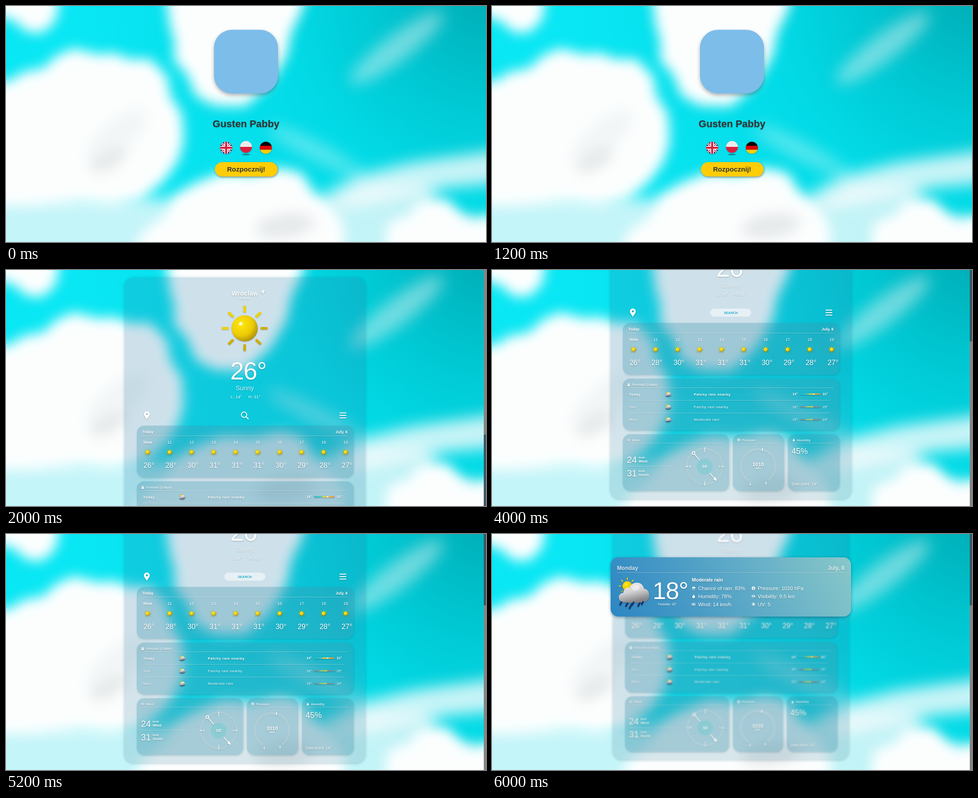
An HTML page for the animation above (8000 ms loop, 1064 px wide and 526 px high).

```html
<!DOCTYPE html>
<html lang="en">
<head>
<meta charset="utf-8">
<title>Weather</title>
<style>
html, body { margin: 0; width: 100%; height: 100%; overflow: hidden; background: #04dfec; }
#stage { position: absolute; left: 0; top: 0; width: 1064px; height: 526px; overflow: hidden; }
#stage div, svg { position: absolute; box-sizing: border-box; }
svg { left: 0; top: 0; overflow: visible; }
text { font-family: "Liberation Sans", Arial, sans-serif; white-space: pre; }
.layer { left: 0; top: 0; width: 1064px; height: 526px; }
.lit { filter: drop-shadow(.6px 1px 1px rgba(0,0,0,.28)); }
#app { height: 760px; transform-origin: 529.5px 377.5px; }
.panel { border-radius: 20px; background: linear-gradient(rgba(42,122,166,.22) 60%, rgba(90,150,170,.22)); box-shadow: 0 1px 7px rgba(20,80,100,.3); }
.card { border-radius: 16px; background: rgba(64,149,172,.33); box-shadow: 1px 2px 4px rgba(30,90,110,.25); }
.logo { left: 461px; top: 53px; width: 142px; height: 142px; border-radius: 40px; background: #7dbdea; box-shadow: 0 4px 8px rgba(0,0,0,.3); }
.start { left: 462.5px; top: 348px; width: 139px; height: 32px; border-radius: 16px; background: #ffcd05; box-shadow: 1px 2px 4px rgba(0,0,0,.4); }
.modal { left: 263px; top: 52px; width: 532.5px; height: 132px; border-radius: 17px; background: linear-gradient(62deg, #2b86c3 0%, #5ba8c7 52%, #89c8c9 100%); box-shadow: 0 2px 6px rgba(0,50,80,.4); }
#bar { right: 0; top: 0; width: 5.5px; height: 526px; background: #3d5663; }
#thumb { left: 0; width: 100%; height: 367px; background: #858585; }
</style>
</head>
<body>
<div id="stage">
  <svg id="sky" width="1064" height="526"></svg>
  <div id="intro" class="layer">
    <div class="logo"></div>
    <div class="start"></div>
    <svg id="introArt" width="1064" height="526"></svg>
  </div>
  <div id="app" class="layer"><svg id="appArt" width="1064" height="760"></svg></div>
  <div id="modal" class="layer">
    <div class="modal"></div>
    <svg id="modalArt" class="lit" width="1064" height="526"></svg>
  </div>
  <div id="bar"><div id="thumb"></div></div>
</div>
<script>
const $ = id => document.getElementById(id);
const SCROLL = 229;

// ---- drawing helpers ----
const text = (x, y, size, str, o = {}) =>
  `<text x="${x}" y="${y}" font-size="${size}" fill="${o.fill || '#fff'}" font-weight="${o.b ? 700 : 400}"` +
  ` text-anchor="${o.at || 'start'}" letter-spacing="${o.ls || 0}" opacity="${o.op || 1}">${str}</text>`;
const rule = (x1, x2, y) => `<path d="M${x1} ${y}H${x2}" stroke="#fff" stroke-opacity=".42" stroke-width=".8"/>`;
const stroke = (d, w = 1, color = '#fff') =>
  `<path d="${d}" fill="none" stroke="${color}" stroke-width="${w}" stroke-linecap="round" stroke-linejoin="round"/>`;
const fill = (d, color = '#fff') => `<path d="${d}" fill="${color}" fill-rule="evenodd"/>`;
const disc = (x, y, r, color = '#fff') => `<circle cx="${x}" cy="${y}" r="${r}" fill="${color}"/>`;
const put = (x, y, s, art) => `<g transform="translate(${x} ${y}) scale(${s})">${art}</g>`;
const blob = (pts, color = '#fcfefe', op = 1) => `<polygon points="${pts}" fill="${color}" opacity="${op}"/>`;
const oval = (x, y, rx, ry, turn, color, op) =>
  `<ellipse rx="${rx}" ry="${ry}" transform="translate(${x} ${y}) rotate(${turn})" fill="${color}" opacity="${op}"/>`;

// ---- sky ----
const soft = (id, d) =>
  `<filter id="${id}" filterUnits="userSpaceOnUse" x="-100" y="-100" width="1264" height="726" color-interpolation-filters="sRGB"><feGaussianBlur stdDeviation="${d}"/></filter>`;
$('sky').innerHTML = `<defs>${soft('soft', 14)}${soft('softer', 17)}
  <radialGradient id="air" gradientUnits="userSpaceOnUse" cx="1064" cy="-20" r="900">
    <stop offset="0" stop-color="#00aeb7"/><stop offset=".25" stop-color="#00c7d2"/>
    <stop offset=".5" stop-color="#02dbe7"/><stop offset="1" stop-color="#0ae7f4"/>
  </radialGradient>
  <radialGradient id="ball" cx=".36" cy=".32" r=".75">
    <stop offset="0" stop-color="#fff9b0"/><stop offset=".13" stop-color="#fae20c"/>
    <stop offset=".6" stop-color="#edcb05"/><stop offset="1" stop-color="#a88a0a"/>
  </radialGradient>
  <linearGradient id="puff" x1="0" y1="0" x2=".35" y2="1">
    <stop offset="0" stop-color="#f6f6f6"/><stop offset=".55" stop-color="#cfcfd1"/><stop offset="1" stop-color="#858589"/>
  </linearGradient>
  <linearGradient id="heat">
    <stop offset="0" stop-color="#16c3dd"/><stop offset=".3" stop-color="#3cc7c4"/>
    <stop offset=".5" stop-color="#e6dc3c"/><stop offset="1" stop-color="#f58b3c"/>
  </linearGradient>
  <linearGradient id="mild">
    <stop offset="0" stop-color="#6fcf9a"/><stop offset="1" stop-color="#dfd83e"/>
  </linearGradient></defs>
  <rect width="1064" height="526" fill="url(#air)"/>
  <g filter="url(#softer)">
    ${blob('-60,400 260,424 350,428 430,470 650,450 740,430 800,400 900,398 965,420 930,458 1120,480 1120,590 -60,590', '#f3f9fb', .8)}
    ${blob('690,428 780,378 900,348 1120,318 1120,392 950,408 850,430 750,450', '#fbfcfd', .8)}
    ${oval(866, 94, 128, 29, -37, '#e2f2f2', .5)}
    ${oval(685, 322, 118, 20, 27, '#d0f6f8', .42)}
  </g>
  <g filter="url(#soft)">
    ${blob('-60,-60 122,-60 112,30 82,60 46,58 20,34 -60,8')}
    ${blob('-60,176 16,164 34,148 84,138 110,112 150,94 206,108 240,104 272,118 320,118 358,158 364,200 390,240 394,300 382,344 352,388 300,432 236,446 170,438 60,446 -60,446')}
    ${blob('350,-60 362,40 374,82 372,120 402,154 420,200 462,222 530,224 586,174 622,112 632,60 656,10 674,-60')}
    ${blob('268,570 306,500 350,470 368,424 416,396 480,370 550,374 606,360 656,372 682,414 722,446 750,492 746,570')}
    ${blob('836,570 846,484 896,464 920,430 982,432 1006,464 1034,484 1064,472 1120,474 1120,570')}
    ${oval(245, 292, 85, 34, -42, '#f1f4f4', .8)}
    ${oval(228, 344, 46, 20, -30, '#e2e4e4', .75)}
    ${oval(618, 490, 66, 28, -8, '#e4e7e8', .85)}
  </g>`;

// ---- weather icons ----
const rays = (r1, r2, w) => Array.from({ length: 8 }, (_, i) =>
  `<path d="M0 ${-r1}V${-r2}" transform="rotate(${i * 45})" stroke="${i > 1 && i < 6 ? '#cfae08' : '#efd30a'}" stroke-width="${w}" stroke-linecap="round"/>`).join('');
const sun = rays(38, 48, 6) + disc(0, 0, 29, 'url(#ball)') +
  oval(-9, -10, 4, 3, -40, '#fff', .75);
const rainLines = [[-25, 18], [-12, 21], [2, 18], [15, 21], [-4, 26], [23, 17]]
  .map(([x, y]) => stroke(`M${x} ${y}l-5 9`, 3.2, '#1c2c66')).join('');
const rainy = put(-14, -14, .37, rays(39, 50, 6) + disc(0, 0, 29, 'url(#ball)')) + rainLines +
  fill('M-22 22C-36 21-37 3-23 1C-22-8-15-12-9-10C-5-25 20-26 23-8C37-8 39 18 25 21Q2 25-22 22Z', 'url(#puff)') +
  oval(5, -10, 9, 6, -20, '#fff', .45) + rainLines.replace(/l-5 9/g, 'm-2 4l-3 6');

// ---- small glyphs, each about 8 units wide around 0,0 ----
const glyph = {
  calendar: fill('M-3.5-3H-2.5V-4H-1.3V-3H1.3V-4H2.5V-3H3.5V4H-3.5ZM-3.5-1.2H3.5V-.7H-3.5Z'),
  wind: stroke('M-4-1.5H1.5C3.5-1.5 3-4 1.2-3.5M-4 0H3C5 0 4.5 3 2.5 2.3M-4 1.6H0C2 1.6 1.5 4.3-.3 3.5', 1),
  gauge: fill('M0-4A4 4 0 1 0 0 4A4 4 0 1 0 0-4ZM-.5-2.5H.5V.6A1.2 1.2 0 1 1-.5.6ZM-2.8-1H-1.8V0H-2.8ZM1.8-1H2.8V0H1.8Z'),
  drop: fill('M0-4C1-1.8 3-.5 3 1.4A3 2.8 0 0 1-3 1.4C-3-.5-1-1.8 0-4Z'),
  rain: fill('M-3 .5A2 2 0 0 1-3-2A3 2.8 0 0 1 2.2-2.7A1.8 1.8 0 0 1 3.2 .5Z') +
    stroke('M-2.5 2l-.6 1.8M-.2 2l-.6 1.8M2.1 2l-.6 1.8', .9),
  eye: fill('M-4.5 0Q0-6 4.5 0Q0 6-4.5 0ZM0-2A2 2 0 1 0 0 2A2 2 0 1 0 0-2Z') + disc(.2, 0, 1),
  uv: disc(0, 0, 2) + `<circle r="3.3" fill="none" stroke="#fff" stroke-width="1.8" pathLength="16" stroke-dasharray="1 1"/>`
};

// ---- welcome screen ----
const round = (id, x, y, r, art) => `<clipPath id="${id}"><circle r="${r}"/></clipPath>` +
  `<g transform="translate(${x} ${y})"><g clip-path="url(#${id})">${art}</g></g>`;
const band = (y, h, color) => `<rect x="-15" y="${y}" width="30" height="${h}" fill="${color}"/>`;
const cross = 'M-15 0H15M0-15V15', saltire = 'M-14-14L14 14M-14 14L14-14';
const line = (d, w, color) => `<path d="${d}" stroke="${color}" stroke-width="${w}"/>`;
$('introArt').innerHTML =
  `<g class="lit">${text(532, 270, 22, 'Gusten Pabby', { b: 1, at: 'middle', fill: '#333' })}</g>` +
  oval(532, 331, 9, 1.7, 0, '#155f70', .65) +
  `<g class="lit">` +
  round('uk', 488, 316, 13.4, band(-15, 30, '#16226b') + line(saltire, 5, '#fff') + line(saltire, 1.6, '#d81e3a') +
    line(cross, 8, '#fff') + line(cross, 4.4, '#d81e3a')) +
  round('pl', 532, 314, 13.2, band(-15, 15, '#ebebeb') + band(0, 15, '#dc1f3f')) +
  round('de', 576, 316, 13.4, band(-15, 11, '#050505') + band(-4.5, 9, '#dd0505') + band(4.5, 11, '#ffce00')) +
  `</g>` + text(532.3, 369, 15.1, 'Rozpocznij!', { b: 1, at: 'middle', fill: '#333' });

// ---- dashboard ----
const box = (cls, x, y, w, h) =>
  `<div class="${cls}" style="left:${x}px;top:${y}px;width:${w}px;height:${h}px"></div>`;
$('app').insertAdjacentHTML('afterbegin',
  box('panel', 263, 17, 532.5, 721.5) + box('card', 290, 347, 479.5, 115) + box('card', 290, 471, 479.5, 115) +
  box('card', 290, 595, 235, 125.5) + box('card', 534, 595, 113, 125.5) + box('card', 656, 595, 113.5, 125.5));

const mid = { at: 'middle' }, bold = { b: 1 }, boldMid = { b: 1, at: 'middle' };
const head = (icon, x, y, str, x2) =>
  `<g opacity=".8">${put(x + 3.5, y - 2.5, .85, glyph[icon])}${text(x + 10.5, y, 7, str, bold)}</g>` + rule(x, x2, y + 4.5);

const now = text(529.5, 57, 14.4, 'Wroclaw', boldMid) + text(529.5, 65, 5.8, '10:58:32', boldMid) +
  fill('M574 44L563.5 48.6L568.4 49.7L569.5 54.5Z') + put(529, 130, 1, sun) +
  text(497, 244, 55, '26°', { ls: -1 }) + text(529.3, 268, 14.4, 'Sunny', { at: 'middle', op: .8 }) +
  text(498, 285.7, 9.6, 'L: 14°') + text(537, 285.7, 9.6, 'H: 31°') +
  fill('M312.2 333.5C310.5 329.5 305.7 326 305.7 321.3A6.5 6.5 0 0 1 318.7 321.3C318.7 326 313.9 329.5 312.2 333.5ZM312.2 319A2.3 2.3 0 1 0 312.2 323.6A2.3 2.3 0 1 0 312.2 319Z') +
  stroke('M740 318.5H753.5M740 324H753.5M740 329.5H753.5', 2);

const temps = [26, 28, 30, 31, 31, 31, 30, 29, 28, 27];
const hours = text(302, 364, 8.7, 'Today', bold) + text(757, 364, 8.7, 'July, 6', { b: 1, at: 'end' }) + rule(302, 757, 369.5) +
  temps.map((t, i) => {
    const x = 314 + i * 48.78;
    return text(x, 386.7, 9, i ? 10 + i : 'Now', i ? mid : boldMid) +
      put(x, 406.3, .165, sun) + text(x - 9.3, 440.7, 16, t + '°');
  }).join('');

const days = [['Today', 'Patchy rain nearby', 14, 31], ['Sun.', 'Patchy rain nearby', 16, 25], ['Mon.', 'Moderate rain', 15, 24]];
const forecast = head('calendar', 299.5, 487, 'Forecast (3 days)', 757) + days.map(([day, sky, lo, hi], i) => {
  const y = 508.5 + i * 28.3, first = i === 0, o = { b: first, ls: .55 };
  const track = (x, w, c) => `<rect x="${x}" y="${y - 4.2}" width="${w}" height="2.6" rx="1.3" fill="${c}"/>`;
  return text(304, y, 8, day, o) + put(391, y - 3, .19, rainy) + text(447.5, y, 8, sky, o) +
    text(666, y - .3, 7.7, lo + '°', { b: first }) + text(733, y - .3, 7.7, hi + '°', { b: first }) +
    (first ? track(683, 45, 'url(#heat)') + disc(713, y - 2.9, 1.5)
           : track(683, 45, '#7894a0') + track(694, 19 - i, 'url(#mild)')) +
    (i < 2 ? rule(304, 750, y + 11) : '');
}).join('');

const speed = (y, n, name) => text(299, y, 20, n) + text(325, y - 10, 6, 'km/h', bold) + text(325, y - 1, 8, name, bold);
const compass = put(471.5, 667, 1,
  `<circle r="39.7" fill="none" stroke="#fff" stroke-opacity=".6" stroke-width="4.6" pathLength="90" stroke-dasharray=".28 .72"/>` +
  text(0, 3.3, 9.4, 'SE', boldMid) +
  stroke('M0-42V-37M0 42V37M-42 0H-37M42 0H37', 1.4) +
  text(0, -32.5, 4.5, 'N', boldMid) + text(0, 36, 4.5, 'S', boldMid) +
  text(-33, 1.6, 4.5, 'W', boldMid) + text(33, 1.6, 4.5, 'E', boldMid) +
  `<circle cx="-25" cy="-30" r="3.2" fill="none" stroke="#fff" stroke-width="1.6"/>` +
  stroke('M-22.5-27L-11.5-14.5M12 15.5L23 28', 1.8) + fill('M27 32L18 28L21.7 26.4L23.5 22.6Z'));
const wind = head('wind', 299.5, 610.5, 'Wind', 514) + speed(659, 24, 'Wind') + rule(300, 403, 666.5) + speed(689, 31, 'Gusts') + compass;

const polar = (r, deg) => [r * Math.cos(deg * Math.PI / 180), r * Math.sin(deg * Math.PI / 180)].map(v => v.toFixed(2)).join(' ');
const pressure = head('gauge', 543.5, 610.5, 'Pressure', 637) + put(590, 667, 1,
  `<path d="M${polar(38.3, 124)}A38.3 38.3 0 1 1 ${polar(38.3, 56)}" fill="none" stroke="#fff" stroke-opacity=".62" stroke-width="5" pathLength="70" stroke-dasharray=".32 .68"/>` +
  stroke('M8.6-35L9.8-40', 2) + text(0, -.7, 11.5, '1010', boldMid) + text(0, 6.3, 6, 'hPa', boldMid) +
  stroke('M-17.5 35V42M-20.5 39L-17.5 42L-14.5 39M17.5 42V35M14.5 38L17.5 35L20.5 38', 1));
const humidity = head('drop', 665.5, 610.5, 'Humidity', 759) + text(664, 639, 18, '45%') + text(664.3, 709, 8.8, 'Dew point: 14°');

$('appArt').innerHTML = `${disc(471.5, 667, 17.5, 'rgba(110,205,208,.45)')}
  <g class="lit">${now}
  <g id="lens">${stroke('M532.5 327.5L537 332', 2.4)}<circle cx="527.7" cy="322.6" r="6" fill="none" stroke="#fff" stroke-width="2"/></g>
  ${hours}${forecast}${wind}${pressure}${humidity}</g>
  <g id="search"><rect x="484" y="315" width="90.5" height="18" rx="9" fill="#fff" opacity=".5"/>
  ${text(529.3, 326.7, 7.3, 'SEARCH', { b: 1, at: 'middle', fill: '#23b2ca' })}</g>`;

// ---- day details ----
const facts = [
  ['rain', 'Chance of rain: 83%', 'gauge', 'Pressure: 1020 hPa'],
  ['drop', 'Humidity: 78%', 'eye', 'Visibility: 9.5 km'],
  ['wind', 'Wind: 14 km/h', 'uv', 'UV: 5']
];
$('modalArt').innerHTML = text(277, 80, 12.4, 'Monday', { b: 1, op: .8 }) +
  text(781, 80, 12.2, 'July, 8', { b: 1, at: 'end', op: .8 }) + rule(277, 781, 86) +
  put(314, 130, 1, rainy) + text(356, 145, 54, '18°', { ls: -1 }) + text(388.5, 159, 6.8, 'Feelslike: 18°', mid) +
  text(443, 106, 10.5, 'Moderate rain', bold) +
  facts.map(([a, left, b, right], i) => {
    const y = 125 + i * 17.8;
    return put(447, y - 4, 1, glyph[a]) + text(457, y, 11.5, left) + put(579.5, y - 4, 1, glyph[b]) + text(589, y, 11.5, right);
  }).join('');

// ---- timeline: every view holds, then cuts ----
const STEP = 2000;
const steps = [
  { intro: 1 },
  { app: 1, lens: 1 },
  { app: 1, search: 1, scroll: 1 },
  { app: 1, search: 1, scroll: 1, modal: 1 }
];
const show = (id, on) => { $(id).style.display = on ? '' : 'none'; };
let current = -1;

function render(ms) {
  const n = Math.floor(ms / STEP) % steps.length;
  if (n === current) return;
  current = n;
  const s = steps[n];
  ['intro', 'app', 'modal', 'lens', 'search'].forEach(id => show(id, s[id]));
  show('bar', s.app);
  $('app').style.transform = `translateY(${s.scroll ? -SCROLL : 0}px) scale(${s.modal ? .98 : 1})`;
  $('app').style.filter = s.modal ? 'blur(1.1px)' : 'none';
  $('thumb').style.top = (s.scroll ? 159 : 0) + 'px';
}

const start = performance.now();
function tick() {
  render(performance.now() - start);
  requestAnimationFrame(tick);
}
tick();
</script>
</body>
</html>
```
